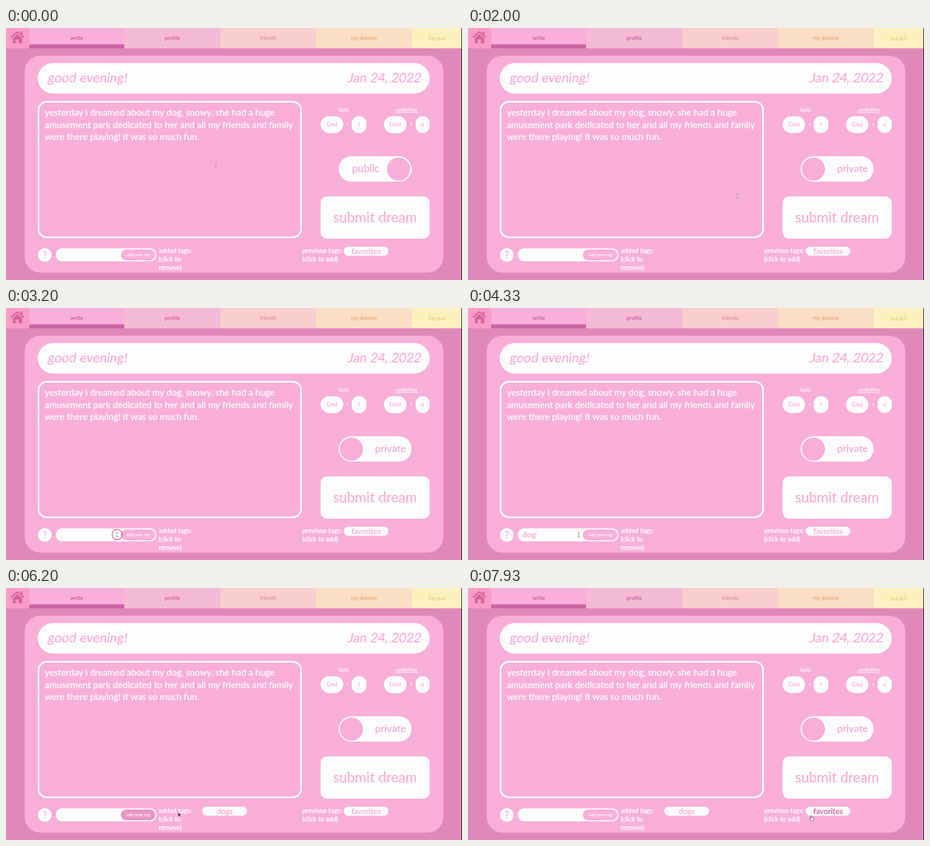
Recreate the animation shown at these times as an HTML page with a canvas. Size 806x446 px, loop 8 s.

```html
<!DOCTYPE html>
<html lang="en">
<head>
<meta charset="utf-8">
<title>Dream journal</title>
<style>
html, body { margin: 0; width: 100%; height: 100%; overflow: hidden; background: #df89bb; }
canvas { display: block; width: 806px; height: 446px; }
</style>
</head>
<body>
<canvas id="stage"></canvas>
<script>
const W = 806, H = 446, LOOP = 8000, STEP = 200 / 3;
const PINK = '#f9aed9', ROSE = '#df89bb', DEEP = '#cb63a3', WHITE = '#fefdfe';
const canvas = document.getElementById('stage');
const ctx = canvas.getContext('2d');
const dpr = window.devicePixelRatio || 1;
canvas.width = W * dpr;
canvas.height = H * dpr;

const TOGGLE_AT = 1200, FOCUS_AT = 3130, ADD_AT = 5660;
const CLICKS = [TOGGLE_AT, FOCUS_AT, ADD_AT];
const TYPED_AT = [3750, 4000, 4200, 4450];

// Pointer stops: time, x, y
const PATH = [
  [0, 371, 244], [250, 371, 244], [800, 614, 239], [1500, 614, 239],
  [2000, 476, 298], [2070, 476, 298], [2750, 196, 401], [4750, 196, 401],
  [5250, 223, 401], [5950, 223, 401], [6450, 386, 397], [6790, 386, 397],
  [7000, 448, 398], [7150, 448, 398], [7650, 606, 403], [LOOP, 606, 403]
];

const TOGGLE = [588, 227, 129, 45];
const EDITOR = [56, 129, 467, 243];
const INPUT = [88, 390, 178, 23];
const ADD = [203, 392, 61, 19];
const DOGS = [347, 387, 79, 16];
const FAVORITES = [597, 387, 79, 16];

const clamp = v => Math.max(0, Math.min(1, v));
const smooth = v => { v = clamp(v); return v * v * (3 - 2 * v); };
const inside = ([px, py], [x, y, w, h]) => px >= x && px <= x + w && py >= y && py <= y + h;

function pointerAt(t) {
  let i = 1;
  while (i < PATH.length - 1 && PATH[i][0] < t) i++;
  const [t0, x0, y0] = PATH[i - 1], [t1, x1, y1] = PATH[i];
  const k = smooth((t - t0) / (t1 - t0));
  return [x0 + (x1 - x0) * k, y0 + (y1 - y0) * k];
}

// Share of the last 300 ms spent over a box, for soft hover changes
function hover(t, box) {
  let n = 0;
  for (let i = 0; i < 6; i++) if (inside(pointerAt(Math.max(0, t - i * 50)), box)) n++;
  return n / 6;
}

function mix(a, b, k) {
  const part = (c, i) => parseInt(c.slice(i, i + 2), 16);
  return 'rgb(' + [1, 3, 5].map(i => Math.round(part(a, i) + (part(b, i) - part(a, i)) * k)) + ')';
}

function box([x, y, w, h], r, fill) {
  ctx.fillStyle = fill;
  ctx.beginPath();
  ctx.roundRect(x, y, w, h, r);
  ctx.fill();
}

function disc(x, y, r, fill) {
  ctx.fillStyle = fill;
  ctx.beginPath();
  ctx.arc(x, y, r, 0, Math.PI * 2);
  ctx.fill();
}

function text(str, x, y, size, color, { align = 'left', weight = 400, slant = 0 } = {}) {
  ctx.save();
  ctx.translate(x, y);
  ctx.transform(1, 0, -slant, 1, 0, 0);
  ctx.font = `${weight} ${size}px Lato, "Open Sans", sans-serif`;
  ctx.textAlign = align;
  ctx.fillStyle = ctx.strokeStyle = color;
  ctx.fillText(str, 0, 0);
  if (weight < 600) {
    // A hairline outline gives a medium weight with round ends
    ctx.lineWidth = 0.35;
    ctx.lineJoin = 'round';
    ctx.strokeText(str, 0, 0);
  }
  ctx.restore();
}

const centered = (str, x, y, size, color, weight = 400, slant = 0) =>
  text(str, x, y, size, color, { align: 'center', weight, slant });

function polygon(points) {
  ctx.beginPath();
  points.forEach(([x, y]) => ctx.lineTo(x, y));
  ctx.closePath();
}

function drawNav() {
  const tabs = [
    ['', 0, 41, '#fa9bc8', DEEP],
    ['write', 41, 209, '#f9afdc', '#c4519a'],
    ['profile', 209, 379, '#f5bad6', '#cd579b'],
    ['friends', 379, 548, '#f9cecd', '#e38587'],
    ['my dreams', 548, 717, '#fbdec4', '#e9a06d'],
    ['log out', 717, 806, '#fdf0bf', '#e6cd73']
  ];
  for (const [name, x0, x1, fill, color] of tabs) {
    ctx.fillStyle = fill;
    ctx.fillRect(x0, 0, x1 - x0, 36);
    centered(name, (x0 + x1) / 2, 21, 9.6, color, 600);
  }
  ctx.fillStyle = DEEP;
  ctx.fillRect(41, 29, 168, 7);
  drawHome();
}

function drawHome() {
  ctx.fillStyle = ctx.strokeStyle = '#d4669f';
  ctx.lineWidth = 2.4;
  ctx.lineCap = ctx.lineJoin = 'round';
  ctx.beginPath();
  ctx.moveTo(9.5, 16);
  ctx.lineTo(20.2, 6.8);
  ctx.lineTo(31, 16);
  ctx.stroke();
  ctx.fillRect(26, 6.5, 3, 7);
  polygon([[20.2, 10.8], [28.5, 18], [28.5, 27], [22.8, 27], [22.8, 20.5],
    [17.6, 20.5], [17.6, 27], [12, 27], [12, 18]]);
  ctx.fill();
}

function drawShortcut(label, key, x, keyX, keyW, slant) {
  const mid = (x + keyX + keyW) / 2;
  centered(label, mid, 148, 9.2, WHITE, 600, slant);
  if (!slant) {
    ctx.fillStyle = WHITE;
    ctx.fillRect(mid - 19, 149.2, 38, 0.9);
  }
  box([x, 156, 40, 30], 15, WHITE);
  box([keyX, 156, keyW, 30], 12.5, WHITE);
  centered('Cmd', x + 20, 174, 9.6, PINK);
  centered('+', (x + 40 + keyX) / 2, 174, 9, WHITE, 700);
  centered(key, keyX + keyW / 2, 174, 9.6, PINK);
}

function drawToggle(t) {
  const isPrivate = t >= TOGGLE_AT;
  const k = smooth((t - TOGGLE_AT) / 250);
  box(TOGGLE, 22.5, WHITE);
  if (isPrivate) text('private', 652, 255, 18.1, PINK);
  else text('public', 611.5, 255, 18.5, PINK);
  disc(694 - 83.5 * k, 249.7, 20.5, PINK);
}

function drawTag(t, name, area) {
  box(area, 8, WHITE);
  centered(name, area[0] + area[2] / 2, 400.3, 13.6, mix(PINK, DEEP, hover(t, area)));
}

function drawTags(t) {
  disc(68.5, 401.8, 12, WHITE);
  centered('?', 68.5, 408, 18, PINK, 600);
  box(INPUT, 11.5, WHITE);
  const typed = t < ADD_AT ? 'dogs'.slice(0, TYPED_AT.filter(at => t >= at).length) : '';
  text(typed, 96.5, 406, 13.8, PINK);
  if (t >= FOCUS_AT && t < ADD_AT) {
    ctx.font = '400 13.8px Lato, "Open Sans", sans-serif';
    ctx.fillStyle = '#fbd0e8';
    ctx.fillRect(97 + ctx.measureText(typed).width, 393.5, 1, 16);
  }
  box(ADD, 9.5, mix(PINK, ROSE, hover(t, ADD)));
  centered('add new tag', 233.5, 404, 7.9, WHITE, 600);

  ['added tags:', '(click to', 'remove)'].forEach((s, i) => text(s, 270, 397.5 + i * 15.2, 11.6, WHITE));
  ['previous tags:', '(click to add)'].forEach((s, i) => text(s, 523.5, 397.5 + i * 15.2, 11.6, WHITE));
  if (t >= ADD_AT) drawTag(t, 'dogs', DOGS);
  drawTag(t, 'favorites', FAVORITES);
}

function drawPanel(t) {
  box([33, 49, 740, 384], 28, PINK);
  box([56, 62, 693, 54], 27, WHITE);
  text('good evening!', 73, 96, 22.8, PINK, { slant: 0.18 });
  text('Jan 24, 2022', 733, 96, 22.8, PINK, { slant: 0.18, align: 'right' });

  ctx.strokeStyle = WHITE;
  ctx.lineWidth = 3;
  ctx.beginPath();
  ctx.roundRect(57.5, 130.5, 464, 240, 15);
  ctx.stroke();
  [
    'yesterday i dreamed about my dog, snowy. she had a huge',
    'amusement park dedicated to her and all my friends and family',
    'were there playing! it was so much fun.'
  ].forEach((s, i) => text(s, 68.5, 155.2 + i * 21.3, 15.97, WHITE));

  drawShortcut('italic', 'i', 556, 611, 26, 0.18);
  drawShortcut('underline', 'u', 668, 724, 25, 0);
  drawToggle(t);
  box([556, 298, 193, 75], 12, WHITE);
  centered('submit dream', 652.3, 344, 24.8, PINK);
  drawTags(t);
}

function drawBeam() {
  ctx.lineCap = 'butt';
  for (const [color, width] of [['#ffffff88', 1.8], ['#7d6a77', 0.8]]) {
    ctx.strokeStyle = color;
    ctx.lineWidth = width;
    ctx.beginPath();
    ctx.moveTo(-1.5, -4);
    ctx.lineTo(1.5, -4);
    ctx.moveTo(0, -4);
    ctx.lineTo(0, 4);
    ctx.moveTo(-1.5, 4);
    ctx.lineTo(1.5, 4);
    ctx.stroke();
  }
}

function drawHand() {
  polygon([[-0.8, 0.3], [0.4, 0], [1, 0.6], [1.2, 3], [4.4, 3.7], [5, 4.8],
    [4.5, 8], [3.8, 9.2], [0.4, 9.2], [-2.4, 5.8], [-2, 4.8], [-0.5, 5.6]]);
  ctx.fillStyle = '#fff';
  ctx.fill();
  ctx.strokeStyle = '#4a3b45';
  ctx.lineWidth = 0.8;
  ctx.stroke();
}

function drawArrow() {
  polygon([[0, -2], [0, 5.2], [1.6, 3.8], [2.6, 6], [3.6, 5.5], [2.6, 3.4], [4.6, 3.2]]);
  ctx.strokeStyle = '#fff';
  ctx.lineWidth = 1;
  ctx.stroke();
  ctx.fillStyle = '#2c2229';
  ctx.fill();
}

function drawPointer(t) {
  const p = pointerAt(t);
  const links = [TOGGLE, ADD, FAVORITES];
  if (t >= ADD_AT) links.push(DOGS);
  ctx.save();
  ctx.translate(...p);
  ctx.lineJoin = 'round';
  if (links.some(area => inside(p, area))) drawHand();
  else if (inside(p, EDITOR) || inside(p, INPUT)) drawBeam();
  else drawArrow();
  if (CLICKS.some(at => t >= at - 30 && t < at + 170)) {
    ctx.strokeStyle = '#e9557f';
    ctx.lineWidth = 1.4;
    ctx.beginPath();
    ctx.arc(0.5, 0, 9, 0, Math.PI * 2);
    ctx.stroke();
  }
  ctx.restore();
}

function draw(t) {
  ctx.setTransform(dpr, 0, 0, dpr, 0, 0);
  ctx.fillStyle = ROSE;
  ctx.fillRect(0, 0, W, H);
  drawNav();
  drawPanel(t);
  drawPointer(t);
  // Dark edge of the window
  ctx.fillStyle = '#000';
  ctx.fillRect(W - 1, 0, 1, H);
}

function tick() {
  const t = performance.now() % LOOP;
  draw(Math.floor((t + 4) / STEP) * STEP % LOOP);
  requestAnimationFrame(tick);
}
tick();
</script>
</body>
</html>
```
